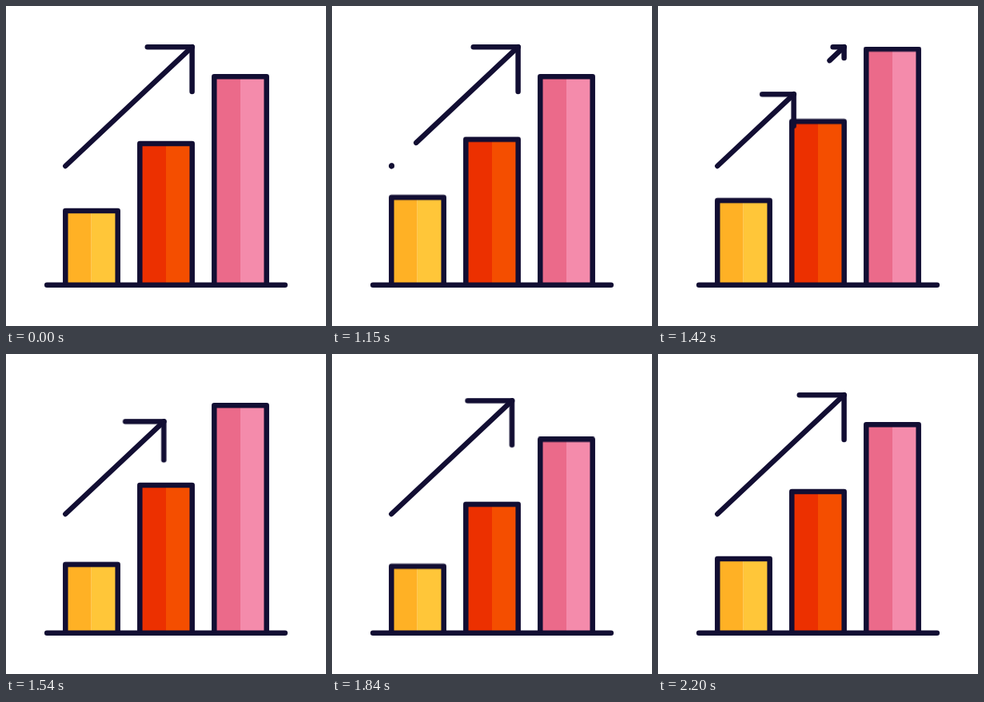
Recreate the animation shown at these times as an HTML page. Size 400 by 400 pixels, loop 2230 ms.

```html
<!DOCTYPE html>
<html lang="en">
<head>
<meta charset="utf-8">
<title>Growth chart</title>
<style>
html, body { margin: 0; width: 100%; height: 100%; overflow: hidden; background: #fff; }
svg { display: block; width: 100%; height: 100%; }

.ink { fill: none; stroke: #120e33; stroke-width: 6.5; stroke-linecap: round; stroke-linejoin: round; }
.trim { stroke-dasharray: 1 3; }

.anim { animation: 2230ms cubic-bezier(.333, 0, .667, 1) infinite; }
.bar1 { animation-name: bar1; }
.bar2 { animation-name: bar2; }
.bar3 { animation-name: bar3; }
.leave { animation-name: leave; animation-timing-function: step-end; }
.leave-line { animation-name: leave-line; }
.leave-arm { animation-name: leave-arm; }
.enter { animation-name: enter; animation-timing-function: step-end; }
.enter-line { animation-name: enter-line; }
.enter-head { animation-name: enter-head; }
.enter-arm { animation-name: enter-arm; }

/* Each bar stretches up, dips, then settles */
@keyframes bar1 {
  0%, 44.843% { transform: translateY(0); }
  56.816% { transform: translateY(-28px); }
  74.798% { transform: translateY(18px); }
  90.762%, 100% { transform: translateY(0); }
}
@keyframes bar2 {
  0%, 48.52% { transform: translateY(0); }
  60.493% { transform: translateY(-32px); }
  78.43% { transform: translateY(19px); }
  94.35%, 100% { transform: translateY(0); }
}
@keyframes bar3 {
  0%, 51.659% { transform: translateY(0); }
  63.632% { transform: translateY(-34.5px); }
  82.825% { transform: translateY(18.5px); }
  98.744%, 100% { transform: translateY(0); }
}

/* The old arrow shrinks into its tip */
@keyframes leave {
  0% { visibility: visible; }
  68.6%, 100% { visibility: hidden; }
}
@keyframes leave-line {
  0%, 44.843% { stroke-dashoffset: 0; }
  68.744%, 100% { stroke-dashoffset: 1; }
}
@keyframes leave-arm {
  0%, 53.318% { stroke-dashoffset: 0; }
  68.744%, 100% { stroke-dashoffset: 1; }
}

/* The new arrow grows from the tail */
@keyframes enter {
  0% { visibility: hidden; }
  50.95%, 100% { visibility: visible; }
}
@keyframes enter-line {
  0%, 50.583% { stroke-dashoffset: 1; animation-timing-function: cubic-bezier(.598, 0, .309, .621); }
  69.058% { stroke-dashoffset: .224; animation-timing-function: cubic-bezier(.185, .58, .486, 1); }
  99.462%, 100% { stroke-dashoffset: 0; }
}
@keyframes enter-head {
  0%, 50.583% { transform: translate(-158.3px, 148.8px); animation-timing-function: cubic-bezier(.598, 0, .309, .621); }
  69.058% { transform: translate(-35.5px, 33.3px); animation-timing-function: cubic-bezier(.185, .58, .486, 1); }
  99.462%, 100% { transform: translate(0, 0); }
}
@keyframes enter-arm {
  0%, 50.897% { stroke-dashoffset: 1; animation-timing-function: cubic-bezier(.333, 0, 0, 1); }
  87.892%, 100% { stroke-dashoffset: 0; }
}
</style>
</head>
<body>
<svg viewBox="0 0 400 400">
  <defs>
    <clipPath id="ground"><rect width="400" height="349"/></clipPath>
  </defs>

  <g clip-path="url(#ground)">
    <g class="anim bar1">
      <path fill="#ffb125" d="M74.3 256h32.4v150H74.3z"/>
      <path fill="#ffc639" d="M106.7 256h33v150h-33z"/>
      <path class="ink" d="M74.3 256h65.4v150H74.3z"/>
    </g>
    <g class="anim bar2">
      <path fill="#ec3000" d="M167.3 172h32.7v234h-32.7z"/>
      <path fill="#f44e00" d="M200 172h32.7v234H200z"/>
      <path class="ink" d="M167.3 172h65.4v234h-65.4z"/>
    </g>
    <g class="anim bar3">
      <path fill="#eb6a8a" d="M260.3 88.3H293V406h-32.7z"/>
      <path fill="#f48bab" d="M293 88.3h32.7V406H293z"/>
      <path class="ink" d="M260.3 88.3h65.4V406h-65.4z"/>
    </g>
  </g>
  <path class="ink" d="M51.2 348.8h297.6"/>

  <g class="ink anim leave">
    <path class="trim anim leave-line" pathLength="1" d="M232.6 51.2L74.3 200"/>
    <path class="trim anim leave-arm" pathLength="1" d="M232.6 51.2h-55.8"/>
    <path class="trim anim leave-arm" pathLength="1" d="M232.6 51.2V107"/>
  </g>

  <g class="ink anim enter">
    <path class="trim anim enter-line" pathLength="1" d="M74.3 200L232.6 51.2"/>
    <g class="anim enter-head">
      <path class="trim anim enter-arm" pathLength="1" d="M232.6 51.2h-55.8"/>
      <path class="trim anim enter-arm" pathLength="1" d="M232.6 51.2V107"/>
    </g>
  </g>
</svg>
</body>
</html>
```
